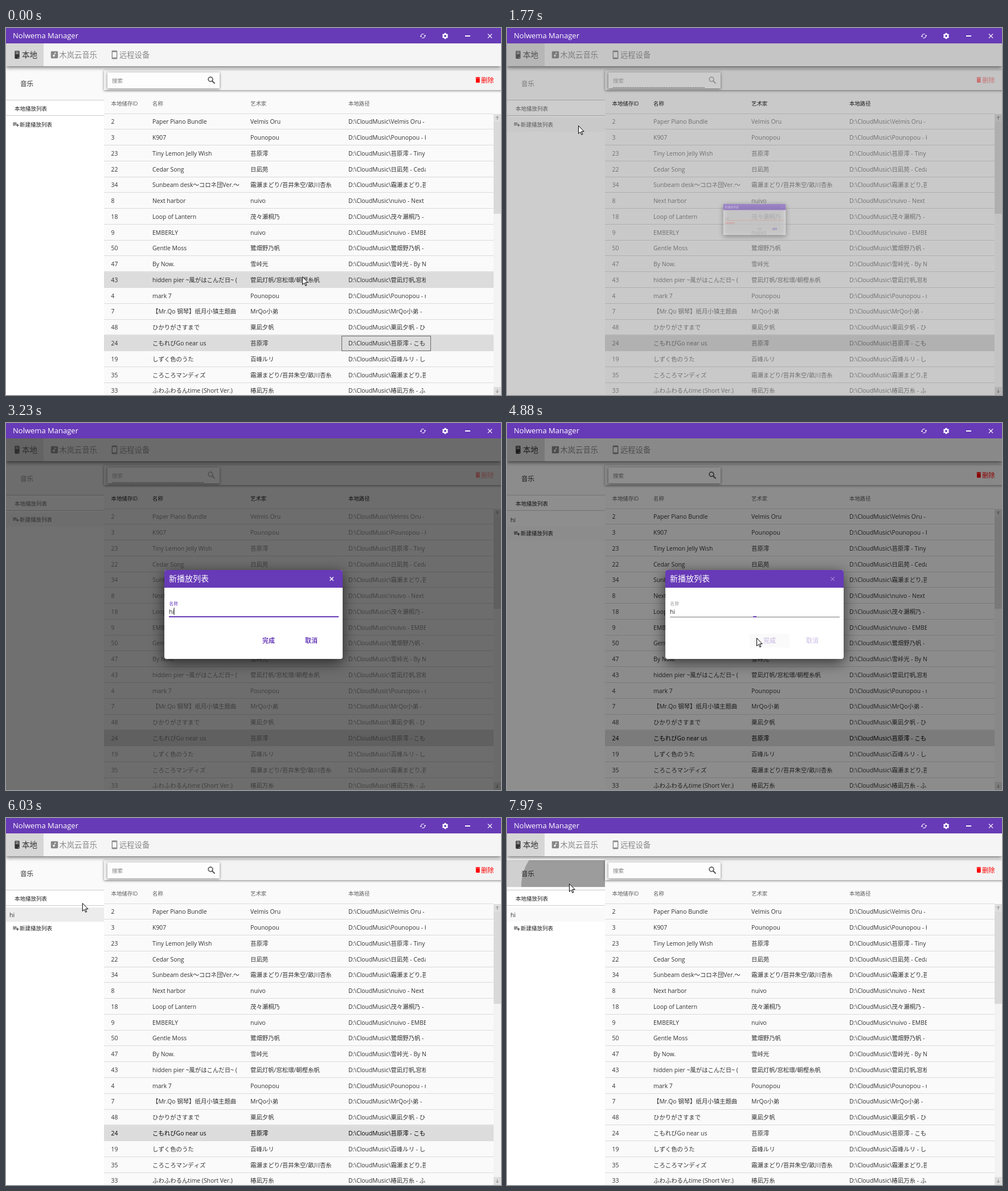
Recreate the animation shown at these times as an HTML page with a canvas. Size 869 px wide and 644 px high, loop 8000 ms.

```html
<!DOCTYPE html>
<html lang="zh">
<head>
<meta charset="utf-8">
<title>Nolwema Manager</title>
<style>
html, body { margin: 0; width: 100%; height: 100%; overflow: hidden; }
canvas { display: block; }
</style>
</head>
<body>
<canvas id="stage" width="869" height="644"></canvas>
<script>
const ctx = document.getElementById('stage').getContext('2d');
const LOOP = 8000, PURPLE = '#673ab7', FONT = '"Open Sans","Noto Sans CJK SC","Noto Sans CJK JP",sans-serif';
const ROW_TOP = 150.5, ROW_H = 27.77, SELECTED = 14;

const trio = '霜瀬まどり/苔井朱空/畝川杏糸';
const songs = [
  [2, 'Paper Piano Bundle', 'Velmis Oru'],
  [3, 'K907', 'Pounopou'],
  [23, 'Tiny Lemon Jelly Wish', '苔原澪'],
  [22, 'Cedar Song', '日凪苑'],
  [34, 'Sunbeam desk～コロネ団Ver.～', trio],
  [8, 'Next harbor', 'nuivo'],
  [18, 'Loop of Lantern', '茂々瀬桐乃'],
  [9, 'EMBERLY', 'nuivo'],
  [50, 'Gentle Moss', '鷺畑野乃帆'],
  [47, 'By Now.', '雪峠光'],
  [43, 'hidden pier ~風がはこんだ日~ (', '菅凪灯帆/窓松環/朝樫糸帆'],
  [4, 'mark 7', 'Pounopou'],
  [7, '【Mr.Qo 钢琴】纸月小镇主题曲', 'MrQo小弟'],
  [48, 'ひかりがさすまで', '粟凪夕帆'],
  [24, 'こもれびGo near us', '苔原澪'],
  [19, 'しずく色のうた', '百峰ルリ'],
  [35, 'ころころマンディズ', trio],
  [33, 'ふわふわるんtime (Short Ver.)', '椿凪万糸'],
];

const icons = {
  tower: 'M8,2H16A2,2 0 0,1 18,4V20A2,2 0 0,1 16,22H8A2,2 0 0,1 6,20V4A2,2 0 0,1 8,2M8,4V6H16V4H8M16,8H8V10H16V8M16,18H14V20H16V18Z',
  music: 'M16,9H13V14.5A2.5,2.5 0 1,1 12,12.5V7H16V9M19,3H5A2,2 0 0,0 3,5V19A2,2 0 0,0 5,21H19A2,2 0 0,0 21,19V5A2,2 0 0,0 19,3Z',
  phone: 'M17,19H7V5H17M17,1H7A2,2 0 0,0 5,3V21A2,2 0 0,0 7,23H17A2,2 0 0,0 19,21V3A2,2 0 0,0 17,1Z',
  trash: 'M19,4H15.5L14.5,3H9.5L8.5,4H5V6H19M6,19A2,2 0 0,0 8,21H16A2,2 0 0,0 18,19V7H6V19Z',
  save: 'M15,9H5V5H15M12,19A3,3 0 1,1 12,13A3,3 0 1,1 12,19M17,3H5A2,2 0 0,0 3,5V19A2,2 0 0,0 5,21H19A2,2 0 0,0 21,19V7L17,3Z',
  add: 'M2,16H10V14H2M18,14V10H16V14H12V16H16V20H18V16H22V14M14,6H2V8H14M14,10H2V12H14V10Z',
  sync: 'M19,8L15,12H18A6,6 0 0,1 9.2,17.3L7.74,18.76A8,8 0 0,0 20,12H23M6,12A6,6 0 0,1 14.8,6.7L16.26,5.24A8,8 0 0,0 4,12H1L5,16L9,12',
};
for (const k in icons) icons[k] = new Path2D(icons[k]);
const arrow = new Path2D('M0,0V13.8L3.2,10.8L5.4,15.8L7.4,14.9L5.2,10.1H9.7Z');

// time, x, y of the pointer tip
const pointerKeys = [
  [0, 520, 436], [490, 520, 436], [1310, 127, 184], [1390, 127, 184], [1470, 125, 171],
  [4180, 125, 171], [4650, 438, 377], [5600, 438, 377], [5800, 302, 275], [5990, 302, 275],
  [6030, 134, 149], [6180, 113, 163], [7150, 113, 163], [7450, 109, 115], [LOOP, 109, 115],
];

const ramp = (t, from, to) => Math.min(1, Math.max(0, (t - from) / (to - from)));
const sine = p => (1 - Math.cos(Math.PI * p)) / 2;
const ease = (t, from, to) => sine(ramp(t, from, to));
const mix = (a, b, p) => a + (b - a) * p;
const ink = a => `rgba(0,0,0,${a})`;
const gray = v => `rgb(${v},${v},${v})`;

function pointerAt(t) {
  const i = pointerKeys.findIndex(k => k[0] > t);
  const [t0, x0, y0] = pointerKeys[i - 1], [t1, x1, y1] = pointerKeys[i];
  const p = ramp(t, t0, t1);
  return { x: mix(x0, x1, p), y: mix(y0, y1, p) };
}

function rect(x, y, w, h, color) {
  ctx.fillStyle = color;
  ctx.fillRect(x, y, w, h);
}

function text(s, x, yMid, size, color, weight = 400, maxWidth = 0) {
  ctx.save();
  if (maxWidth) {
    ctx.beginPath();
    ctx.rect(x, yMid - 14, maxWidth, 28);
    ctx.clip();
  }
  ctx.font = `${weight} ${size}px ${FONT}`;
  ctx.fillStyle = color;
  ctx.fillText(s, x, yMid + size * 0.38);
  ctx.restore();
}

function icon(name, x, y, size, color) {
  ctx.save();
  ctx.translate(x - size / 2, y - size / 2);
  ctx.scale(size / 24, size / 24);
  ctx.fillStyle = color;
  ctx.fill(icons[name], 'evenodd');
  ctx.restore();
}

function line(x0, y0, x1, y1, color, width = 1) {
  ctx.strokeStyle = color;
  ctx.lineWidth = width;
  ctx.beginPath();
  ctx.moveTo(x0, y0);
  ctx.lineTo(x1, y1);
  ctx.stroke();
}

function cross(x, y, r, color) {
  line(x - r, y - r, x + r, y + r, color, 1.3);
  line(x - r, y + r, x + r, y - r, color, 1.3);
}

// Canvas shadows ignore the transform, so they are scaled here.
function panel(x, y, w, h, r, color, blur, drop, shade) {
  const scale = ctx.getTransform().a;
  ctx.save();
  ctx.shadowColor = ink(shade);
  ctx.shadowBlur = blur * scale;
  ctx.shadowOffsetY = drop * scale;
  ctx.fillStyle = color;
  ctx.beginPath();
  ctx.roundRect(x, y, w, h, r);
  ctx.fill();
  ctx.restore();
}

function ripple(x, y, r, top, h, alpha) {
  if (r <= 0 || alpha <= 0) return;
  ctx.save();
  ctx.beginPath();
  ctx.rect(0, top, 172, h);
  ctx.clip();
  ctx.globalAlpha = alpha;
  ctx.fillStyle = '#9c9c9c';
  ctx.beginPath();
  ctx.arc(x, y, r, 0, 7);
  ctx.fill();
  ctx.restore();
}

function titleBar() {
  rect(0, 0, 869, 27, PURPLE);
  text('Nolwema Manager', 12, 13.5, 13, '#fff');
  icon('sync', 732, 14, 12, '#fff');
  ctx.save();
  ctx.translate(771, 14);
  ctx.strokeStyle = '#fff';
  ctx.lineWidth = 2.4;
  ctx.beginPath();
  ctx.arc(0, 0, 3.1, 0, 7);
  ctx.stroke();
  for (let i = 0; i < 6; i++) {
    rect(-1.3, -5.3, 2.6, 2, '#fff');
    ctx.rotate(Math.PI / 3);
  }
  ctx.restore();
  rect(806, 13, 9, 2, '#fff');
  cross(849.5, 14, 3.6, '#fff');
}

function tabs(off) {
  const active = off ? '#666' : '#333', idle = off ? '#999' : '#888';
  panel(0, 27, 869, 40, 0, '#f5f5f5', 7, 2, 0.6);
  rect(0, 27, 66, 40, off ? '#e2e2e2' : '#d6d6d6');
  icon('tower', 19.5, 47, 16.6, active);
  text('本地', 28, 47, 13.5, active);
  icon('music', 85, 47, 16.6, idle);
  text('木岚云音乐', 93.5, 47, 13.3, idle);
  icon('phone', 190.5, 47, 16.6, idle);
  text('远程设备', 199, 47, 13.3, idle);
}

function sidebar(t, off) {
  const added = t > 4760, addY = added ? 193.5 : 169;
  rect(0, 67, 172, 60, '#fafafa');
  rect(0, 127, 172, 517, '#fff');
  if (t > 7300) rect(0, 74, 172, 47, gray(mix(250, 208, ramp(t, 7300, 7600))));
  ripple(109, 120, 84 * ramp(t, 7700, 7970), 74, 47, 1);
  text('音乐', 25, 98, 11.6, ink(off ? 0.42 : 0.8));
  line(0, 126.5, 172, 126.5, '#ccc');
  line(0, 153.5, 172, 153.5, '#ccc');
  text('本地播放列表', 15, 141, 9.5, ink(off ? 0.56 : 0.87));
  if (t > 1400 && t < 5500) rect(0, addY - 12, 172, 25, ink(0.02));
  if (added) {
    if (t > 5990) rect(0, 157, 172, 25, gray(mix(236, 249, ramp(t, 7750, 7970))));
    ripple(113, 168, 97 * (t - 6250) / 570, 157, 25, 1 - ramp(t, 6860, 7050));
    text('hi', 6, 170, 10.4, ink(0.8));
  }
  icon('add', 17.5, addY, 12.5, ink(off ? 0.58 : 0.85));
  text('新建播放列表', 24, addY, 9.5, ink(off ? 0.56 : 0.87));
}

function toolbar(playlist, off) {
  panel(172, 74, 700, 35, 0, '#f3f3f3', 4, 1, 0.5);
  ctx.save();
  if (playlist) {
    icon('save', 202, 91, 14, PURPLE);
    text('保存当前排序', 208, 91.5, 11, PURPLE);
  } else {
    panel(178, 78, 197, 28, 1, '#fdfdfd', 4, 1, 0.5);
    const tone = ink(off ? 0.27 : 0.65);
    text('搜索', 186, 92, 9.5, ink(off ? 0.3 : 0.5));
    ctx.strokeStyle = tone;
    ctx.lineWidth = 1.7;
    ctx.beginPath();
    ctx.arc(359, 90, 3.9, 0, 7);
    ctx.stroke();
    line(361.8, 92.8, 366.5, 97.5, tone, 2);
    if (off) {
      ctx.setLineDash([1.4, 1.6]);
      line(186, 104.5, 348, 104.5, '#333');
    }
  }
  ctx.restore();
  ctx.globalAlpha = off ? 0.4 : 1;
  icon('trash', 828.3, 91, 13.5, '#f00');
  text('删除', 834, 92, 11.2, '#f00');
  ctx.globalAlpha = 1;
}

function songList(t, playlist, off, pointer) {
  ['本地储存ID', '名称', '艺术家', '本地路径'].forEach((s, i) =>
    text(s, [184.5, 257, 429, 601][i], 132, 9.4, ink(off ? 0.85 : 0.62)));
  line(172, 150.5, 856, 150.5, '#ddd');
  rect(856, 151, 13, 493, '#f3f3f3');
  if (!playlist) {
    const over = !off && pointer.x > 172 ? Math.floor((pointer.y - ROW_TOP) / ROW_H) : -1;
    songs.forEach(([id, name, artist], i) => {
      const top = ROW_TOP + i * ROW_H, mid = top + 13.8, chosen = i === SELECTED && t < 7100;
      if (chosen || i === over) rect(172, top, 684, ROW_H, '#dcdcdc');
      const tone = ink(off ? 0.45 : chosen && t > 4760 ? 1 : 0.8);
      text(id, 184.5, mid, 10.4, tone);
      text(name, 257, mid, 10.4, tone, 400, 152);
      text(artist, 429, mid, 10.4, tone, 400, 152);
      text(`D:\\CloudMusic\\${artist.replaceAll('/', ',')} - ${name}`, 601, mid, 10.4, tone, 400, 136);
      const edge = Math.round(top + ROW_H) - 0.5;
      line(172, edge, 856, edge, '#dadada');
    });
    if (t < 1500) {
      ctx.strokeStyle = '#666';
      ctx.lineWidth = 1;
      ctx.strokeRect(589.5, 540.5, 156, 26);
    }
    rect(856, 151, 13, 175, '#d9d9d9');
  }
  for (const [y, dir] of [[158, -1], [637, 1]]) {
    rect(856, y - 7, 13, 14, '#dedede');
    line(862.5, y - 3, 862.5, y + 3, '#888');
    line(860, y + dir * 0.5, 862.5, y + dir * 3, '#888');
    line(865, y + dir * 0.5, 862.5, y + dir * 3, '#888');
  }
}

function nameDialog(t) {
  const typed = t < 3080 ? '' : t < 3200 ? 'h' : 'hi';
  const leave = ramp(t, 4740, 4870);
  const floated = ease(t, 2230, 2530);
  const focus = floated * (1 - ease(t, 4690, 4900));
  panel(278, 258, 313, 156, 4, '#fff', 24, 6, 0.65);
  ctx.fillStyle = PURPLE;
  ctx.beginPath();
  ctx.roundRect(278, 258, 313, 31, [4, 4, 0, 0]);
  ctx.fill();
  text('新播放列表', 286, 273, 14, '#fff');
  cross(571.7, 273.5, 3.2, `rgba(255,255,255,${mix(0.6, 1, ramp(t, 2230, 2500)) - 0.7 * leave})`);

  const accent = typed ? PURPLE : '#f44336';
  text('名称', 286.5, mix(331, 317, floated), mix(10.4, 7.7, floated), focus > 0.5 ? accent : '#999');
  line(286, 340.5, 584, 340.5, typed ? '#777' : '#f44336');
  rect(435 - 149 * focus, 339, 298 * focus, 2, accent);
  if (!typed) text('名称不能为空', 286.5, 356, 8.3, '#f44336');
  text(typed, 286, 331, 10.4, ink(0.85));
  const caret = (t > 2320 && t < 2850) || (t >= 3080 && t < 3860) || (t > 4390 && t < 4690);
  if (caret) rect(286 + [0, 6.4, 8.6][typed.length], 324, 1, 13, '#222');

  rect(426, 370, 70, 24, ink(0.02 * ramp(t, 4560, 4700)));
  ctx.globalAlpha *= 1 - 0.75 * leave;
  text('取消', 525, 382, 10.9, PURPLE, 700);
  ctx.globalAlpha *= mix(0.3, 1, ramp(t, 3060, 3200));
  text('完成', 450, 382, 10.9, PURPLE, 700);
}

function loadingDialog(t) {
  panel(396.5, 297.5, 76, 76, 3, '#fdfdfd', 22, 6, 0.6);
  const start = -0.1 + (t - 6820) * 0.007;
  ctx.strokeStyle = PURPLE;
  ctx.lineWidth = 2.2;
  ctx.beginPath();
  ctx.arc(434.5, 335.5, 10.8, start, start + 1.5 + 0.8 * Math.sin((t - 6820) / 160));
  ctx.stroke();
}

const dialogs = [
  { open: 1650, close: 4790, draw: nameDialog },
  { open: 6330, close: 6620, draw: loadingDialog },
];

function frame() {
  const t = performance.now() % LOOP;
  const pointer = pointerAt(t);
  const dialog = dialogs.find(d => t >= d.open && t < d.close + 300);
  const off = !!dialog && t < dialog.close;
  const playlist = t > 6300 && t < 7860;

  rect(0, 0, 869, 644, '#fafafa');
  sidebar(t, off);
  toolbar(playlist, off);
  songList(t, playlist, off, dialog ? { x: 0, y: 0 } : pointer);
  tabs(off);
  if (dialog) {
    const grow = ease(t, dialog.open, dialog.open + 300);
    rect(0, 27, 869, 617, ink(0.56 * Math.min(grow, 1 - ease(t, dialog.close, dialog.close + 300))));
    ctx.save();
    ctx.globalAlpha = Math.min(1, grow * 1.5);
    ctx.translate(434.5, 336);
    ctx.scale(grow, grow);
    ctx.translate(-434.5, -336);
    dialog.draw(t);
    ctx.restore();
  }
  titleBar();
  if (t < 2160 || t > 4180) {
    ctx.save();
    ctx.translate(pointer.x + 0.5, pointer.y + 0.5);
    ctx.fillStyle = '#fff';
    ctx.strokeStyle = '#000';
    ctx.lineWidth = 1;
    ctx.fill(arrow);
    ctx.stroke(arrow);
    ctx.restore();
  }
  requestAnimationFrame(frame);
}
frame();
</script>
</body>
</html>
```
